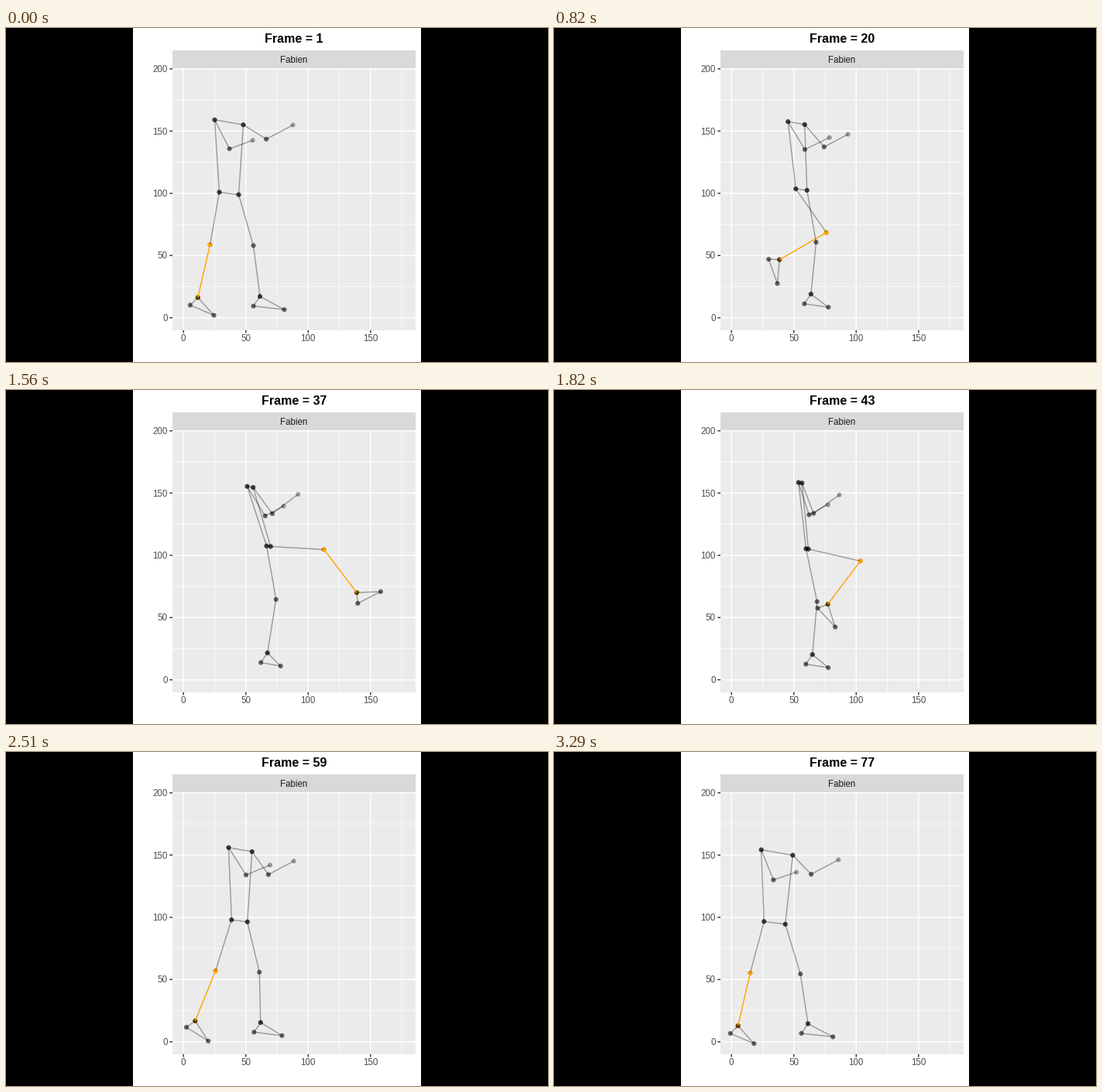
These frames come from a looping animation (700x432 px, 3.33 s). A matplotlib script:

```python
import numpy as np
import matplotlib.pyplot as plt
from matplotlib.animation import FuncAnimation
from matplotlib.collections import LineCollection
from matplotlib.patches import Rectangle

W, H, DPI = 700, 432, 80
PX = 72 / DPI            # points per pixel
TICK = 10                # ms per animation step
LOOP = 3330
POSE_TICKS = 4.33        # steps each pose is held

plt.rcParams["font.family"] = "Liberation Sans"


def sx(v):
    return 229.2 + 1.611 * v


def sy(v):
    return 374.8 - 1.610 * v


# ---- motion ----

def smooth(keys):
    """Monotone cubic through rows of (time, value, value, ...)."""
    keys = np.array(keys, float)
    t, p = keys[:, 0], keys[:, 1:]
    h = np.diff(t)[:, None]
    d = np.diff(p, axis=0) / h
    m = np.zeros_like(p)
    same = d[:-1] * d[1:] > 0
    total = np.where(same, d[:-1] + d[1:], 1)
    m[1:-1] = np.where(same, 2 * d[:-1] * d[1:] / total, 0)

    def at(i):
        i = min(i, t[-1])
        k = min(np.searchsorted(t, i, side="right") - 1, len(t) - 2)
        u = (i - t[k]) / h[k]
        return ((1 + 2 * u) * (1 - u) ** 2 * p[k] + u * (1 - u) ** 2 * h[k] * m[k]
                + u * u * (3 - 2 * u) * p[k + 1] + u * u * (u - 1) * h[k] * m[k + 1])
    return at


# pose, hip centre x y, chest centre x y, twist, upper arm angles
body = smooth([
    (0, 288, 214, 288, 122, -1.0, 63, 32),     # guard
    (19, 319.5, 209, 313, 123, -0.58, 59, 49),  # step in
    (29, 350, 200, 312, 132, 0.25, 35, 42),    # high kick
    (42, 327, 205.5, 318, 120, 0.12, 69, 72),  # recoil
    (51, 319.5, 214, 316, 122, -0.4, 49, 65),  # step back
    (66, 285, 221, 288, 130, -1.1, 68, 46),    # guard
])

# pose, thigh angle, shin angle of the kicking leg
kick = smooth([
    (0, 100, 103), (13, 100, 115), (19, 55, 150), (22, 30, 125), (29, -54.5, -35),
    (33, -4, 16), (37, 5, 65), (42, 13, 127), (51, 97, 134), (55, 108, 118), (66, 105, 103),
])


def polar(length, deg):
    a = np.radians(deg)
    return length * np.array([np.cos(a), np.sin(a)])


def skeleton(i):
    hx, hy, cx, cy, twist, arm1, arm2 = body(i)
    thigh, shin = kick(i)
    turn = 1 + twist               # 0 when side-on in guard
    lean = (hx - 286) / 64         # 0 in guard, 1 over the standing foot
    hip, chest = np.array([hx, hy]), np.array([cx, cy])
    j = {}

    for side, sign in (("1", 1), ("2", -1)):
        j["shoulder" + side] = chest + sign * twist * np.array([18.5, 3.2])
        j["hip" + side] = hip + sign * twist * np.array([12.5, 1.6])

    j["elbow1"] = j["shoulder1"] + polar(42, arm1)
    j["wrist1"] = j["elbow1"] + polar(32 + 8 * turn, -20 - 14 * turn)
    j["elbow2"] = j["shoulder2"] + polar(35 + 8 * turn, arm2)
    j["wrist2"] = j["elbow2"] + polar(39 - 10 * turn, -28)

    j["knee1"] = j["hip1"] + polar(69, thigh)
    j["ankle1"] = j["knee1"] + polar(70, shin)
    j["heel1"] = j["ankle1"] + polar(14, shin + 32)
    j["toe1"] = j["ankle1"] + polar(31, shin - 55)

    j["ankle2"] = np.array([328 + 14 * lean ** 2, 343 + 0.6 * (hy - 207)])
    j["knee2"] = (j["hip2"] + j["ankle2"]) / 2 + [5 + 8 * lean, 0]
    j["heel2"] = j["ankle2"] + [-8.5, 12.5]
    j["toe2"] = j["ankle2"] + [32 - 18 * lean, 17]
    return j


SIDE = [("shoulder", "elbow"), ("elbow", "wrist"), ("shoulder", "hip"), ("hip", "knee"),
        ("knee", "ankle"), ("ankle", "heel"), ("ankle", "toe"), ("heel", "toe")]
bones = [("shoulder1", "shoulder2"), ("hip1", "hip2")]
bones += [(a + s, b + s) for s in "12" for a, b in SIDE]
GREY, ORANGE = (0, 0, 0, 0.35), (1, 165 / 255, 0, 1)
colors = [ORANGE if b == ("knee1", "ankle1") else GREY for b in bones]


# ---- static chart ----

fig = plt.figure(figsize=(W / DPI, H / DPI), dpi=DPI, facecolor="black")
ax = fig.add_axes([0, 0, 1, 1])
ax.set_xlim(0, W)
ax.set_ylim(H, 0)
ax.axis("off")

LEFT, RIGHT, STRIP, TOP, BOTTOM = 215, 529, 29, 52.8, 390.8


def box(x0, y0, x1, y1, color):
    ax.add_patch(Rectangle((x0, y0), x1 - x0, y1 - y0, fc=color, lw=0, zorder=0))


def rule(x, y, color, width):
    ax.plot(x, y, color=color, lw=width * PX, solid_capstyle="butt", snap=False, zorder=1)


def label(x, y, s, size, color, ha="center", **kw):
    return ax.text(x, y, s, size=size * PX, color=color, ha=ha, va="baseline", **kw)


box(164, 0, 536, H, "white")
box(LEFT, STRIP, RIGHT, TOP, "#D9D9D9")
box(LEFT, TOP, RIGHT, BOTTOM, "#EBEBEB")

for v in range(25, 200, 50):
    rule([sx(v)] * 2, [TOP, BOTTOM], "white", 0.71)
    rule([LEFT, RIGHT], [sy(v)] * 2, "white", 0.71)
for v in range(0, 201, 50):
    rule([LEFT, RIGHT], [sy(v)] * 2, "white", 1.42)
    rule([LEFT - 3.7, LEFT], [sy(v)] * 2, "#333333", 1.42)
    label(208.7, sy(v) + 4.2, str(v), 11.5, "#4D4D4D", "right")
    if v < 200:
        rule([sx(v)] * 2, [TOP, BOTTOM], "white", 1.42)
        rule([sx(v)] * 2, [BOTTOM, BOTTOM + 3.7], "#333333", 1.42)
        label(sx(v) - 0.2, 405.3, str(v), 11.5, "#4D4D4D")

label(371.2, 45.3, "Fabien", 11.5, "#1A1A1A")
title = label(371.8, 19, "", 16, "black", weight="bold")

dots = ax.scatter(np.zeros(2 * len(bones)), np.zeros(2 * len(bones)), s=(6.1 * PX) ** 2,
                  c=np.repeat(colors, 2, axis=0), linewidths=0, zorder=3)
lines = LineCollection([], colors=colors, linewidths=1.42 * PX, zorder=4)
ax.add_collection(lines)


def update(step):
    pose = int((step + 0.5) / POSE_TICKS)
    pos = skeleton(pose)
    segs = np.array([[pos[a], pos[b]] for a, b in bones])
    lines.set_segments(segs)
    dots.set_offsets(segs.reshape(-1, 2))
    title.set_text(f"Frame = {pose + 1}")
    return lines, dots, title


anim = FuncAnimation(fig, update, frames=LOOP // TICK, interval=TICK,
                     repeat=True, repeat_delay=0, blit=False)
plt.show()
```
